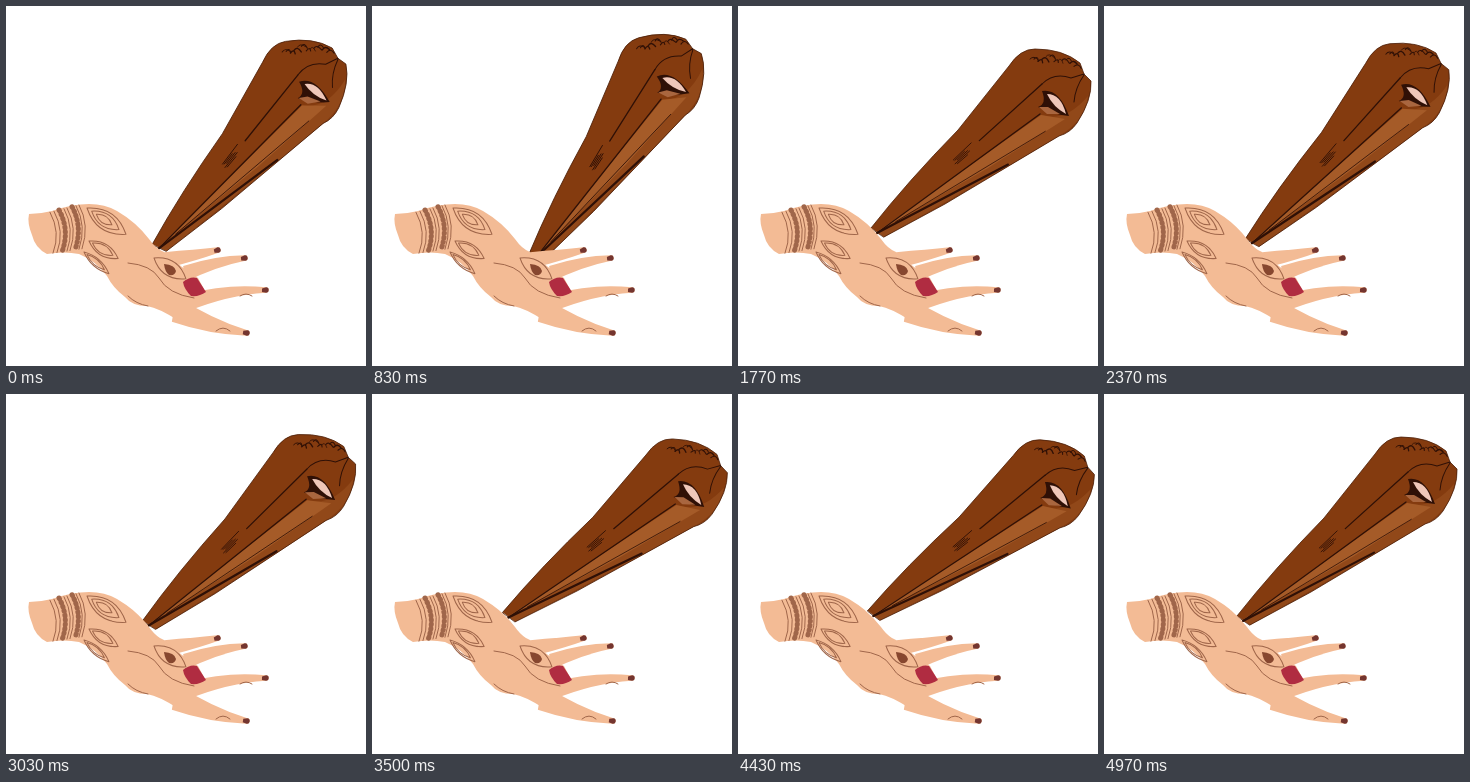
Animation of 360x360 px, one loop 5010 ms. Source, as an HTML page:

```html
<!DOCTYPE html>
<html lang="en">
<head>
<meta charset="utf-8">
<title>Henna hand and cone</title>
<style>
  html, body { margin: 0; width: 100%; height: 100%; overflow: hidden; background: #fff; }
  svg { display: block; width: 100vw; height: 100vh; }
  path { stroke-linecap: round; stroke-linejoin: round; }
</style>
</head>
<body>
<svg viewBox="0 0 360 360"><g id="cone"></g><g id="hand"></g></svg>
<script>
const LOOP = 5010;
const SKIN = '#f3bb95', HENNA = '#a0664a', NAIL = '#74352f', INK = '#2f1006';
const cone = document.getElementById('cone');
const hand = document.getElementById('hand');

function add(parent, d, attrs) {
  const path = document.createElementNS('http://www.w3.org/2000/svg', 'path');
  for (const [name, value] of Object.entries({ d, fill: 'none', ...attrs })) path.setAttribute(name, value);
  parent.append(path);
}
const fill = (parent, d, color) => add(parent, d, { fill: color });
const line = (parent, d, color, width = 1) => add(parent, d, { stroke: color, 'stroke-width': width });

let seed = 7;
const random = () => (seed = seed * 16807 % 2147483647) / 2147483647;

// Cone: body, lit faces, and creases that fan out from the tip
const tip = [139, 227];
const body = 'M133 222 Q170 175 220 124 L271 60 Q282 43 297 43 Q325 43 342 57 L346 68 L353 75 Q354 94 339 117 Q332 127 321 130 L264 164 L207 198 L146 231 Z';
fill(cone, body, '#843b0f');
fill(cone, 'M139 226 L303 109 Q327 117 350 90 Q347 115 321 130 L264 164 L146 231 Z', '#914819');
fill(cone, 'M139 226 L303 109 L327 113 L250 162 Z', '#a55b28');
line(cone, body, '#4d200a', .8);

function crease(x, y, from, to, width) {
  const at = u => [tip[0] + (x - tip[0]) * u, tip[1] + (y - tip[1]) * u];
  line(cone, `M${at(from)} L${at(to)}`, INK, width);
}
crease(302, 108, 0, 1, 1.3);
crease(326, 114, .1, .9, .8);
crease(321, 132, 0, .72, 2.2);
crease(304, 78, .62, 1, 1.3);
for (let i = 0; i < 5; i++) crease(232, 138 + i * 2.2, .82 + random() * .06, .92 + random() * .1, .9);

// Crumpled paper along the rounded end
for (let x = 292; x < 338; x += 4) {
  const y = 46 + (x - 297) ** 2 * .0065 + random() * 10;
  line(cone, `M${x} ${y} q${2 + random() * 3} -4 ${4 + random() * 5} ${random() * 3}`, INK, .7 + random() * .7);
}
line(cone, 'M304 78 Q316 66 333 72 L346 68 M346 69 Q337 82 336 96', INK, 1);

fill(cone, 'M304 85 Q321 82 331 110 Q316 109 300 101 Q309 98 304 85 Z', INK);
fill(cone, 'M309 88 Q323 88 328 108 Q315 101 309 88 Z', '#efc7b9');
fill(cone, 'M301 101 L310 101 L322 108 L309 108 Z', '#a9663f');

// Hand: tapered fingers with a dark tip, then the palm
function finger(x0, y0, cx, cy, x1, y1, base) {
  const end = Math.atan2(y1 - cy, x1 - cx);
  const nx = -Math.sin(end), ny = Math.cos(end), r = 2.7, b = base / 2, m = (b + r) / 2;
  const side = (x, y, w) => `${x + nx * w} ${y + ny * w}`;
  fill(hand, `M${side(x0, y0, -b)} Q${side(cx, cy, -m)} ${side(x1, y1, -r)}
    A${r} ${r} 0 0 1 ${side(x1, y1, r)} Q${side(cx, cy, m)} ${side(x0, y0, b)} Z`, SKIN);
  const bx = x1 - 4 * Math.cos(end), by = y1 - 4 * Math.sin(end);
  fill(hand, `M${side(bx, by, -1.5)} L${side(x1, y1, -r)} A${r} ${r} 0 0 1 ${side(x1, y1, r)} L${side(bx, by, 2)} Z`, NAIL);
}
finger(160, 254, 190, 249, 212, 244, 16);
finger(178, 268, 210, 255, 239, 252, 16);
finger(180, 297, 222, 283, 260, 284, 18);
finger(168, 303, 205, 321, 241, 327, 26);
fill(hand, 'M23 208 Q34 208 46 205 Q66 198 83 198 Q99 198 111 205 Q130 216 143 233 Q150 243 158 246 L176 261 L192 272 L200 287 L187 301 L173 315 Q153 302 141 300 Q126 300 119 291 Q107 282 101 270 Q90 255 73 248 Q58 245 41 248 Q29 242 26 229 Q21 217 23 208 Z', SKIN);
fill(hand, 'M177 276 Q184 270 191 272 L200 286 Q193 291 185 290 Q178 283 177 276 Z', '#b02c41');

// Henna: bracelets around the wrist
const band = x => `M${x} ${206 - (x - 45) * .25} q11 20 3 ${41 + (x - 45) * .1}`;
for (const x of [44, 48, 58, 61, 70, 73]) line(hand, band(x), HENNA);
for (const x of [53, 66]) {
  add(hand, band(x), { stroke: HENNA, 'stroke-width': 5, 'stroke-dasharray': '1 3.5', 'stroke-linecap': 'butt' });
}

// Nested leaf outlines
function leaf(x, y, angle, length, width, layers) {
  for (let i = 0; i < layers; i++) {
    const s = 1 - i * .3, l = length * s, w = width * s, start = length * i * .12;
    add(hand, `M${start} 0 q${l / 2} ${-w} ${l} 0 q${-l / 2} ${w} ${-l} 0`, {
      stroke: HENNA, 'stroke-width': 1, transform: `translate(${x} ${y}) rotate(${angle})`
    });
  }
}
leaf(81, 202, 34, 47, 18, 3);
leaf(83, 235, 31, 34, 12, 2);
leaf(78, 246, 41, 33, 8, 2);
leaf(148, 252, 33, 38, 15, 1);
line(hand, 'M122 257 Q145 259 153 272 Q162 288 188 292 M122 290 Q130 298 142 300 M210 325 q7 -6 14 0 M234 290 q6 -4 12 0', HENNA);
fill(hand, 'M158 258 Q169 259 170 265 Q169 270 163 269 Q159 266 158 258 Z', '#87472f');

// Turning points of the swing: time in ms, angle in degrees
const turns = [
  [0, -9.2], [540, -21.5], [1460, 4.5], [1770, 0], [2000, 4.5], [2540, -9],
  [2840, -14], [3030, -2.6], [3450, 3.4], [3750, -18], [4000, 4.5], [LOOP, 0]
];

function angleAt(t) {
  const i = turns.findIndex(turn => turn[0] > t);
  const [t0, a0] = turns[i - 1], [t1, a1] = turns[i];
  return a0 + (a1 - a0) * (1 - Math.cos(Math.PI * (t - t0) / (t1 - t0))) / 2;
}

const start = performance.now();
function draw() {
  const t = Math.max(0, performance.now() - start) % LOOP;
  cone.setAttribute('transform', `rotate(${angleAt(t)} 241 148)`);
  requestAnimationFrame(draw);
}
draw();
</script>
</body>
</html>
```
